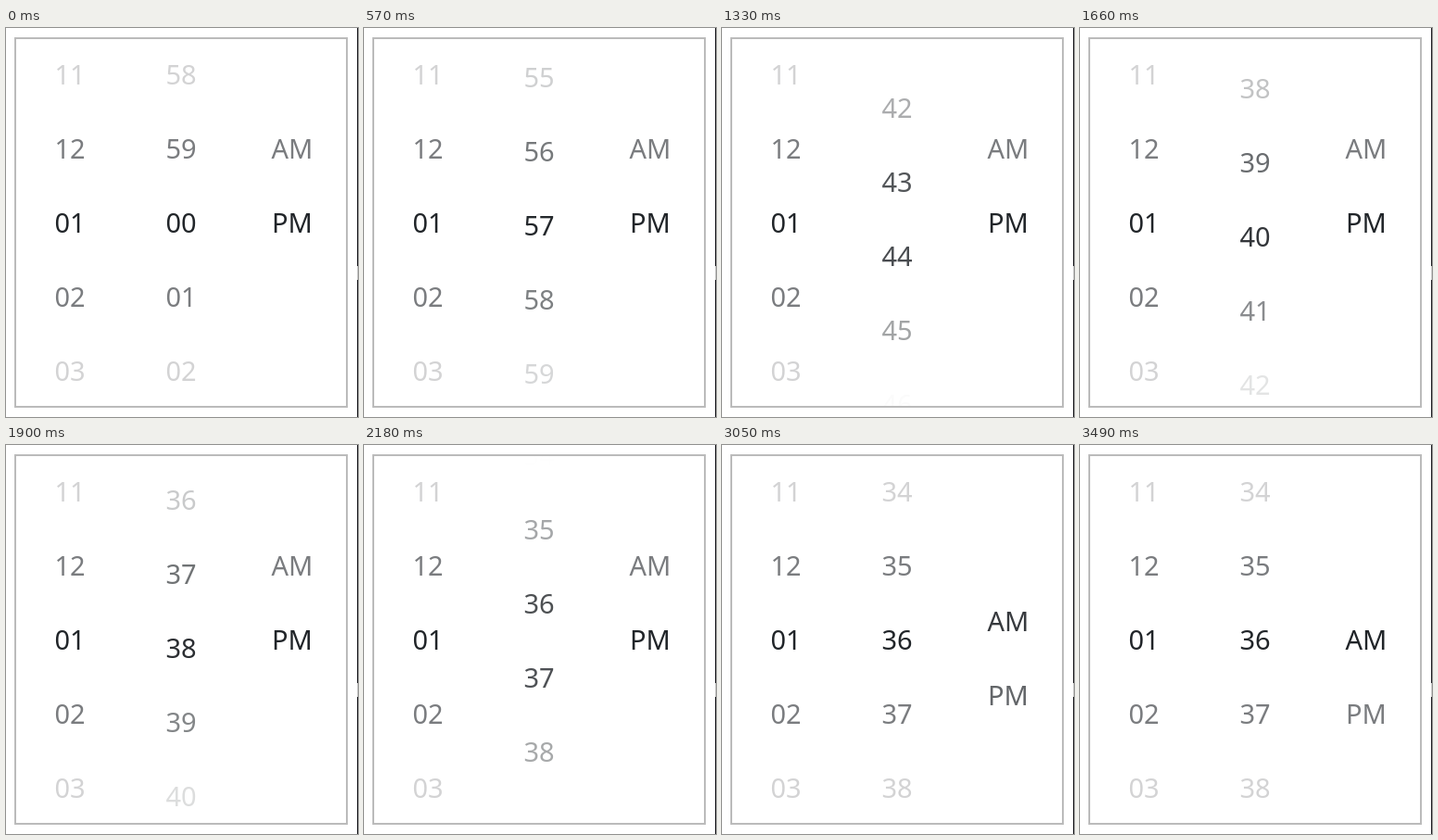
Animation of 380 by 420 pixels, one loop 3.75 s. Source, as an HTML page:

```html
<!DOCTYPE html>
<html lang="en">
<head>
<meta charset="utf-8">
<title>Time picker</title>
<style>
  html, body { margin: 0; width: 100%; height: 100%; overflow: hidden; background: #fff; }
  svg { display: block; width: 380px; height: 420px; }
  text { font: 400 29px "Noto Sans", "Open Sans", sans-serif; fill: #212529; text-anchor: middle; }
</style>
</head>
<body>
<svg viewBox="0 0 380 420">
  <clipPath id="inside"><rect x="11" y="12" width="356" height="396"/></clipPath>
  <rect width="380" height="420" fill="#fff"/>
  <path d="M379 0h1v257h-1zM379 272h1v148h-1z" fill="#1b1b20"/>
  <rect x="379" y="257" width="1" height="15" fill="#ccc"/>
  <rect x="10" y="11" width="358" height="398" fill="none" stroke="#bbb" stroke-width="2"/>
  <g id="wheels" clip-path="url(#inside)"></g>
</svg>
<script>
const LOOP = 3750;
const ROW = 80;
const BASELINE = 221;
const FADE = 200;
const wheels = document.getElementById('wheels');

const pad = n => String(n).padStart(2, '0');
const clamp01 = x => Math.min(1, Math.max(0, x));
const progress = (t, from, to) => clamp01((t - from) / (to - from));

// A wheel draws the rows around a fractional position; label() may return ''.
function makeWheel(x, label) {
  const rows = Array.from({ length: 7 }, () => {
    const el = document.createElementNS('http://www.w3.org/2000/svg', 'text');
    el.setAttribute('x', x);
    return wheels.appendChild(el);
  });
  return pos => {
    const first = Math.round(pos) - 3;
    rows.forEach((el, i) => {
      const dy = (first + i - pos) * ROW;
      el.textContent = label(first + i);
      el.setAttribute('y', (BASELINE + dy).toFixed(2));
      el.setAttribute('fill-opacity', Math.max(0, 1 - Math.abs(dy) / FADE).toFixed(3));
    });
  };
}

const hours = makeWheel(69, n => pad((n + 11) % 12 + 1));
const minutes = makeWheel(189, n => pad(n % 60));
const halves = makeWheel(309, n => ['AM', 'PM'][n] || '');

// Constant deceleration over 24 rows, after a short accelerating drag.
const coast = t => 24 * (1 - (1 - progress(t, 437, 2470)) ** 2);
function minutePos(t) {
  const moved = t < 490 ? coast(490) * progress(t, 390, 490) ** 2 : coast(t);
  return 60 - moved;
}

// Pulled beyond the last row, then released back onto it.
function halfPos(t) {
  const peak = 126 / ROW;
  const pull = progress(t, 2895, 3215);
  const back = 1 - (1 - progress(t, 3215, 3490)) ** 3;
  return 1 - peak * pull * pull * (3 - 2 * pull) + (peak - 1) * back;
}

// The picture advances in 40 ms ticks.
function tick(t) {
  const phase = t >= 1460 && t < 2900 ? 20 : 10;
  return Math.floor((t - phase) / 40) * 40 + phase;
}

function draw(time) {
  const t = tick(time % LOOP);
  minutes(minutePos(t));
  halves(halfPos(t));
}

hours(1 + 12);
draw(0);
const start = performance.now();
function loop() {
  draw(performance.now() - start);
  requestAnimationFrame(loop);
}
requestAnimationFrame(loop);
</script>
</body>
</html>
```
